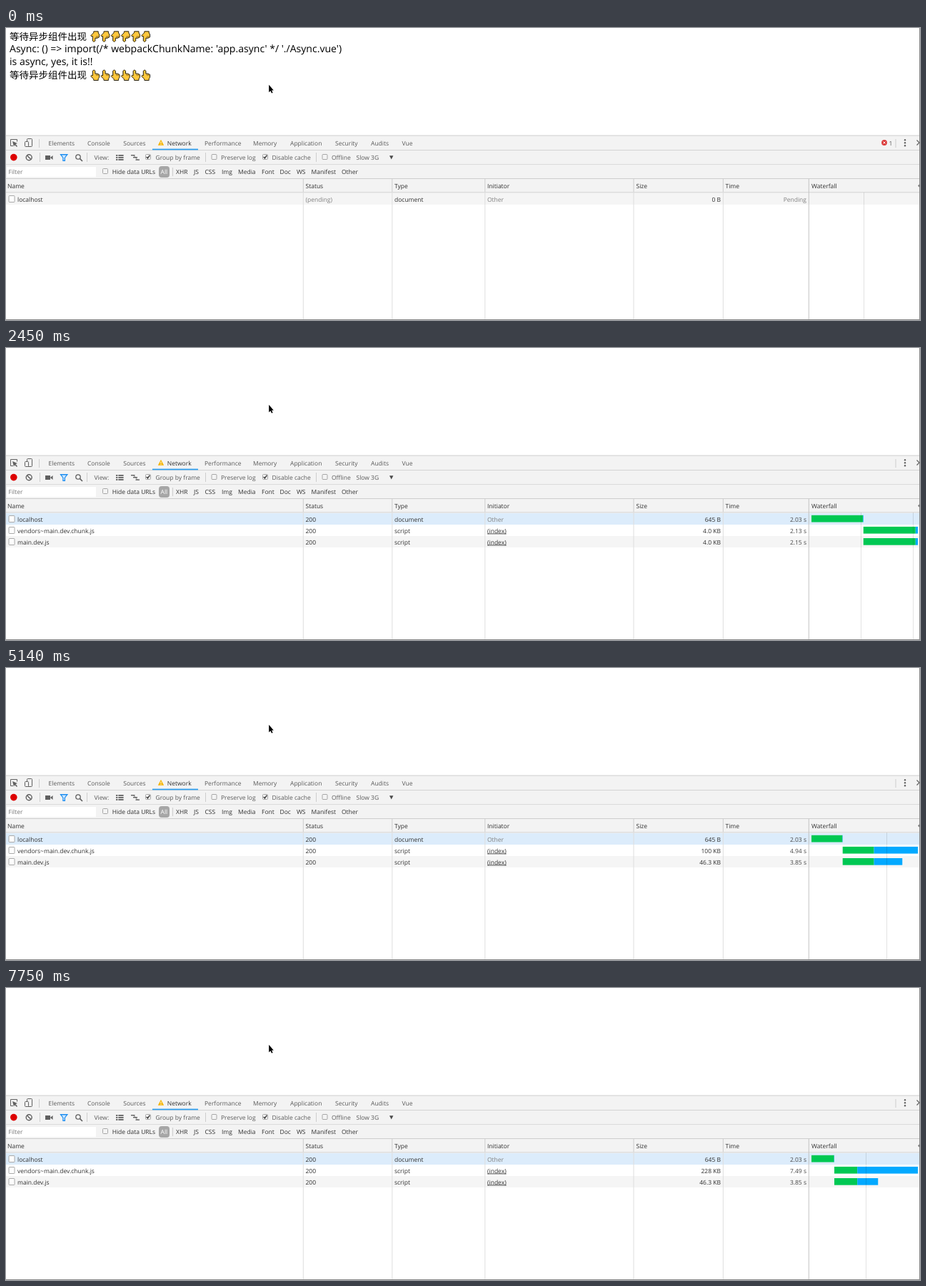
Recreate the animation shown at these times as an HTML page with a canvas. Size 1280x410 px, loop 8 s.

```html
<!DOCTYPE html>
<html lang="zh">
<head>
<meta charset="utf-8">
<title>Network panel</title>
<style>
  html, body { margin: 0; width: 1280px; height: 410px; overflow: hidden; background: #fff; }
  canvas, svg { position: absolute; left: 0; top: 0; display: block; }
  text {
    font: 8.5px "Open Sans", "Noto Sans", sans-serif;
    text-rendering: geometricPrecision;
    white-space: pre;
  }
  .page { font-size: 14.06px; }
  .cjk { font-family: "Noto Sans CJK SC", "Noto Sans CJK", sans-serif; font-size: 13.5px; }
  .end { text-anchor: end; }
  .link { text-decoration: underline; }
</style>
</head>
<body>
<canvas id="stage" width="1280" height="410"></canvas>
<svg width="1280" height="410"><g id="fixed"></g><g id="live"></g></svg>
<script>
const LOOP = 8000;
const ctx = document.getElementById('stage').getContext('2d');
const fixed = document.getElementById('fixed');
const live = document.getElementById('live');

const INK = '#303030', SOFT = '#5a5a5a', DIM = '#808080', ICON = '#5f5f5f';
const BAR = '#f3f3f3', LINE = '#cdcdcd', GREEN = '#00c853', BLUE = '#03a9ff';

// start ms, then size and seconds for the two scripts (null = pending)
const steps = [
  [0],
  [270, null, 0, null, 0],
  [2260, '4.0 KB', 2.13, null, 0],
  [2350, '4.0 KB', 2.13, '4.0 KB', 2.15],
  [3660, '36.0 KB', 3.41, '4.0 KB', 2.15],
  [3760, '36.0 KB', 3.41, '36.0 KB', 3.5],
  [4120, '36.0 KB', 3.41, '46.3 KB', 3.85],
  [4500, '68.0 KB', 4.3, '46.3 KB', 3.85],
  [5140, '100 KB', 4.94, '46.3 KB', 3.85],
  [5790, '132 KB', 5.57, '46.3 KB', 3.85],
  [6450, '164 KB', 6.2, '46.3 KB', 3.85],
  [7100, '196 KB', 6.85, '46.3 KB', 3.85],
  [7750, '228 KB', 7.49, '46.3 KB', 3.85]
];

function label(group, x, y, str, fill = INK, cls = '') {
  const el = document.createElementNS('http://www.w3.org/2000/svg', 'text');
  el.setAttribute('x', x);
  el.setAttribute('y', y);
  el.setAttribute('fill', fill);
  if (cls) el.setAttribute('class', cls);
  el.textContent = str;
  group.append(el);
}

function rect(x, y, w, h, fill) {
  ctx.fillStyle = fill;
  ctx.fillRect(x, y, w, h);
}

function paint(fill, stroke, width) {
  if (fill) {
    ctx.fillStyle = fill;
    ctx.fill();
  }
  if (stroke) {
    ctx.strokeStyle = stroke;
    ctx.lineWidth = width;
    ctx.stroke();
  }
}

function poly(points, fill, stroke, width = 1) {
  ctx.beginPath();
  for (let i = 0; i < points.length; i += 2) ctx.lineTo(points[i], points[i + 1]);
  if (fill) ctx.closePath();
  paint(fill, stroke, width);
}

function circle(x, y, r, fill, stroke, width = 1) {
  ctx.beginPath();
  ctx.arc(x, y, r, 0, Math.PI * 2);
  paint(fill, stroke, width);
}

function box(x, y, w, h, fill, stroke, r = 1, width = 1) {
  ctx.beginPath();
  ctx.roundRect(x, y, w, h, r);
  paint(fill, stroke, width);
}

function check(x, y, on) {
  box(x + .5, y + .5, 7, 7, '#f4f4f4', '#a6a6a6');
  if (on) poly([x + 1.8, y + 4, x + 3.4, y + 5.8, x + 6.4, y + 1.6], null, '#333', 1.4);
}

function hand(x, y, flip) {
  ctx.save();
  ctx.translate(x, y);
  if (flip) ctx.scale(1, -1);
  ctx.lineJoin = 'round';
  ctx.beginPath();
  ctx.moveTo(3.3, 2);
  ctx.quadraticCurveTo(5.1, -.8, 6.9, 2);
  ctx.lineTo(6.9, 5.8);
  ctx.quadraticCurveTo(10, 5, 12.6, 7.2);
  ctx.lineTo(12.6, 11);
  ctx.lineTo(11.2, 13);
  ctx.lineTo(11.2, 15.2);
  ctx.lineTo(4.9, 15.2);
  ctx.lineTo(4.6, 13.2);
  ctx.lineTo(.8, 9.4);
  ctx.quadraticCurveTo(1.4, 7.2, 3.3, 8.6);
  ctx.closePath();
  paint('#ffc83d', '#26200f', 1);
  poly([8.8, 6.4, 8.8, 8.8], null, '#26200f', .6);
  poly([10.7, 6.8, 10.7, 8.8], null, '#26200f', .6);
  ctx.restore();
}

function cursor() {
  poly([368.2, 79.8, 368.2, 90.2, 370.5, 88.2, 372, 91.6, 373.6, 90.9, 372.1, 87.6, 374.8, 87.4], '#000');
}

function tabBar(errors) {
  rect(0, 151, 1279, 21, BAR);
  rect(0, 150.5, 1279, 1, LINE);
  rect(0, 171.2, 1279, 1, LINE);
  // inspect and device icons
  poly([10, 165.5, 6.5, 165.5, 6.5, 156.5, 15.5, 156.5, 15.5, 159.5], null, ICON);
  poly([9, 159, 16, 162, 13.4, 163, 16, 166, 15, 167, 12.2, 164.2, 11, 166.5], ICON);
  box(29.5, 155.5, 7, 11, null, ICON, 1);
  box(26.5, 159.5, 5, 7, BAR, ICON, 1);
  rect(46, 156, 1, 12, LINE);
  // warning sign and selected tab
  poly([217, 156.8, 221.2, 164.8, 212.8, 164.8], '#f4b400');
  rect(216.5, 159.6, 1, 2.6, '#fff');
  rect(216.5, 163, 1, 1, '#fff');
  rect(205, 169.6, 64, 1.7, '#2d9ff0');
  if (errors) {
    circle(1230, 161, 3.9, '#db3b3b');
    poly([1228.5, 159.5, 1231.5, 162.5], null, '#fff');
    poly([1231.5, 159.5, 1228.5, 162.5], null, '#fff');
  }
  rect(1245.5, 156, 1, 12, LINE);
  for (const y of [157.3, 161.3, 165.3]) circle(1259, y, 1.2, ICON);
  poly([1275.5, 157.5, 1279, 161, 1275.5, 164.5], null, ICON, 1.2);
}

function toolBar() {
  rect(0, 172.2, 1279, 19, BAR);
  rect(0, 191, 1279, 1, '#dadada');
  circle(10.8, 181.6, 4.8, '#dd0000');
  circle(32.2, 181.8, 4, null, ICON, 1.4);
  poly([29.4, 179, 35, 184.6], null, ICON, 1.4);
  for (const x of [47, 113, 279, 434]) rect(x, 175, 1, 13, LINE);
  rect(55, 179, 7, 6, ICON);
  poly([62, 182, 65.5, 179, 65.5, 185], ICON);
  poly([76.5, 177.7, 85.8, 177.7, 82.4, 182.2, 82.4, 186.3, 79.9, 186.3, 79.9, 182.2], '#d5ebff', '#1a8cf0', 1.2);
  poly([76.5, 177.7, 86.3, 177.7], null, '#1a8cf0', 1.2);
  circle(101, 181, 3.2, null, ICON, 1.3);
  poly([103.4, 183.4, 107, 187], null, ICON, 1.6);
  for (const y of [178, 181, 184]) {
    rect(154, y, 2.4, 1.8, ICON);
    rect(157.4, y, 7.2, 1.8, ICON);
  }
  rect(175, 178, 5.5, 1.4, ICON);
  rect(178, 181, 6, 1.4, ICON);
  rect(181.5, 184.4, 5.5, 1.4, ICON);
  poly([178.5, 178.5, 184, 185], null, ICON, .8);
  check(195, 177, true);
  check(287.5, 177, false);
  check(359, 177, true);
  check(442.5, 177, false);
  poly([537, 179.3, 542.4, 179.3, 539.7, 184.5], '#4a4a4a');
}

function filterBar() {
  rect(0, 192, 1279, 19, BAR);
  rect(1, 195, 125, 14, '#fff');
  check(135, 197, false);
  box(214, 194, 15, 16, '#a6a6a6', null, 4);
  rect(233, 196, 1, 12, LINE);
}

function table(rows) {
  rect(0, 211, 1279, 20, BAR);
  rect(0, 211, 1279, 1, LINE);
  rect(0, 230.4, 1279, 1, LINE);
  rect(0, 232, 1279, 16, rows > 1 ? '#dcecfb' : '#f5f5f5');
  if (rows > 2) rect(0, 264, 1279, 16, '#f5f5f5');
  for (const x of [415.8, 540.3, 670.3, 878.5, 1003.8]) {
    rect(x, 212, 1, 18, LINE);
    rect(x, 231, 1, 178, '#dedede');
  }
  rect(1123.8, 212, 1, 197, '#c4c4c4');
  for (let i = 0; i < rows; i++) box(4, 235.5 + i * 16, 8, 9, '#fdfdfd', '#a9a9a9', .8);
  poly([1279, 219.5, 1279, 223.5, 1277, 221.5], '#777');
}

function waterfall(rows, scripts) {
  const total = rows > 1 ? Math.max(2.065, ...scripts.map(s => s[1] && 2.05 + s[1])) : 1.99;
  const px = t => Math.min(1277, 1128 + 149 * t / total);
  const span = (row, from, to, fill) => rect(px(from), 234.8 + row * 16.1, px(to) - px(from), 9.7, fill);
  if (rows > 1) {
    span(0, 0, 2.03, GREEN);
    span(0, 2.03, 2.05, BLUE);
    scripts.forEach(([size, sec], i) => {
      if (!size) return;
      span(i + 1, 2.05, 4.11, GREEN);
      span(i + 1, 4.11, 2.12 + sec, BLUE);
    });
  }
  const sec = 153.5 / total;
  const gap = sec * ([1, 2, 5].find(n => n * sec >= 48) || 10);
  for (let x = 1124 + gap; x < 1278; x += gap) rect(Math.floor(x), 231, 1, 178, 'rgba(0,0,0,.11)');
}

function row(i, name, status, type, size, time) {
  const y = 243.5 + i * 16;
  label(live, 16, y, name);
  label(live, 419.5, y, status ? '200' : '(pending)', status ? INK : DIM);
  label(live, 544, y, type);
  if (i) label(live, 674, y, '(index)', INK, 'link');
  else label(live, 674, y, 'Other', DIM);
  label(live, 1001, y, size || '0 B', INK, 'end');
  label(live, 1121, y, status ? time.toFixed(2) + ' s' : 'Pending', status ? '#484848' : DIM, 'end');
}

function pageText() {
  const wait = '等待异步组件出现';
  label(live, 5, 17, wait, '#000', 'cjk');
  label(live, 5, 34.3, "Async: () => import(/* webpackChunkName: 'app.async' */ './Async.vue')", '#000', 'page');
  label(live, 5, 52, 'is async, yes, it is!!', '#000', 'page');
  label(live, 5, 70.5, wait, '#000', 'cjk');
  for (let i = 0; i < 6; i++) {
    hand(118 + i * 14.2, 20, true);
    hand(118 + i * 14.2, 58.3, false);
  }
}

function labels(y, items, fill) {
  for (const [x, str] of items) label(fixed, x, y, str, fill);
}

function drawFixedText() {
  labels(165, [[59.5, 'Elements'], [114, 'Console'], [164.3, 'Sources'], [278, 'Performance'], [346, 'Memory'],
    [398, 'Application'], [461, 'Security'], [511, 'Audits'], [554.5, 'Vue']], SOFT);
  labels(165, [[225.8, 'Network']], INK);
  labels(185, [[123.5, 'View:'], [209.5, 'Group by frame'], [301, 'Preserve log'], [372.5, 'Disable cache'],
    [456, 'Offline'], [490.5, 'Slow 3G']], SOFT);
  labels(205.3, [[3.5, 'Filter']], '#757575');
  labels(205.3, [[216.5, 'All']], '#fff');
  labels(205.3, [[148.7, 'Hide data URLs'], [238, 'XHR'], [263, 'JS'], [278.5, 'CSS'], [302, 'Img'], [325, 'Media'],
    [358, 'Font'], [383.5, 'Doc'], [407, 'WS'], [427.5, 'Manifest'], [470, 'Other']], INK);
  labels(224.7, [[2, 'Name'], [419.5, 'Status'], [544, 'Type'], [674, 'Initiator'], [882.5, 'Size'],
    [1007.5, 'Time'], [1128, 'Waterfall']], INK);
}

function draw(step) {
  const first = step.length === 1;
  const rows = first ? 1 : 3;
  const [, vSize, vTime, mSize, mTime] = step;
  live.replaceChildren();
  rect(0, 0, 1280, 410, '#fff');
  tabBar(first);
  toolBar();
  filterBar();
  table(rows);
  waterfall(rows, [[vSize, vTime], [mSize, mTime]]);
  if (first) {
    pageText();
    label(live, 1236.5, 165, '1', SOFT);
    row(0, 'localhost', false, 'document');
  } else {
    row(0, 'localhost', true, 'document', '645 B', 2.03);
    row(1, 'vendors~main.dev.chunk.js', vSize, 'script', vSize, vTime);
    row(2, 'main.dev.js', mSize, 'script', mSize, mTime);
  }
  rect(0, 409, 1280, 1, '#8a8a8a');
  rect(1279, 0, 1, 410, '#8a8a8a');
  cursor();
}

let shown;
function tick() {
  const t = performance.now() % LOOP;
  const step = steps.findLast(s => s[0] <= t);
  if (step !== shown) draw(shown = step);
  requestAnimationFrame(tick);
}

drawFixedText();
tick();
</script>
</body>
</html>
```
